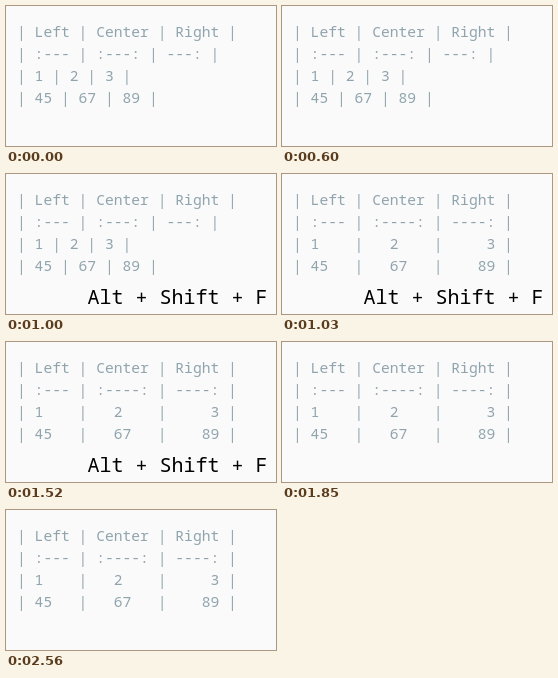
Animation, 270 px wide and 140 px high, one loop 3030 ms. Source, as an HTML page:

```html
<!DOCTYPE html>
<html lang="en">
<head>
<meta charset="utf-8">
<title>Markdown table formatting</title>
<style>
  html, body { margin: 0; width: 100%; height: 100%; overflow: hidden; background: #fafafa; }
  svg { display: block; width: 270px; height: 140px; }
  text { font-family: "Noto Sans Mono", monospace; white-space: pre; }
  #table { font-size: 14.66px; font-weight: 500; fill: #90a4ae; }
  #keys { font-size: 20px; font-weight: 300; fill: #000; }
</style>
</head>
<body>
<svg viewBox="0 0 270 140">
  <rect width="270" height="140" fill="#fafafa"/>
  <g id="table"></g>
  <text id="keys" x="81.4" y="130" visibility="hidden">Alt + Shift + F</text>
</svg>
<script>
const LOOP = 3030, KEYS_ON = 1000, FORMAT_AT = 1030, KEYS_OFF = 1850;
const raw = [
  "| Left | Center | Right |",
  "| :--- | :---: | ---: |",
  "| 1 | 2 | 3 |",
  "| 45 | 67 | 89 |"
];
const formatted = [
  "| Left | Center | Right |",
  "| :--- | :----: | ----: |",
  "| 1    |   2    |     3 |",
  "| 45   |   67   |    89 |"
];

const table = document.getElementById("table");
const keys = document.getElementById("keys");
const rows = raw.map((_, i) => {
  const row = document.createElementNS("http://www.w3.org/2000/svg", "text");
  row.setAttribute("x", 11);
  row.setAttribute("y", 31 + 22 * i);
  return table.appendChild(row);
});

function draw(t) {
  const lines = t < FORMAT_AT ? raw : formatted;
  rows.forEach((row, i) => {
    if (row.textContent !== lines[i]) row.textContent = lines[i];
  });
  keys.setAttribute("visibility", t >= KEYS_ON && t < KEYS_OFF ? "visible" : "hidden");
}

const start = performance.now();
function tick() {
  draw((performance.now() - start) % LOOP);
  requestAnimationFrame(tick);
}
tick();
</script>
</body>
</html>
```
